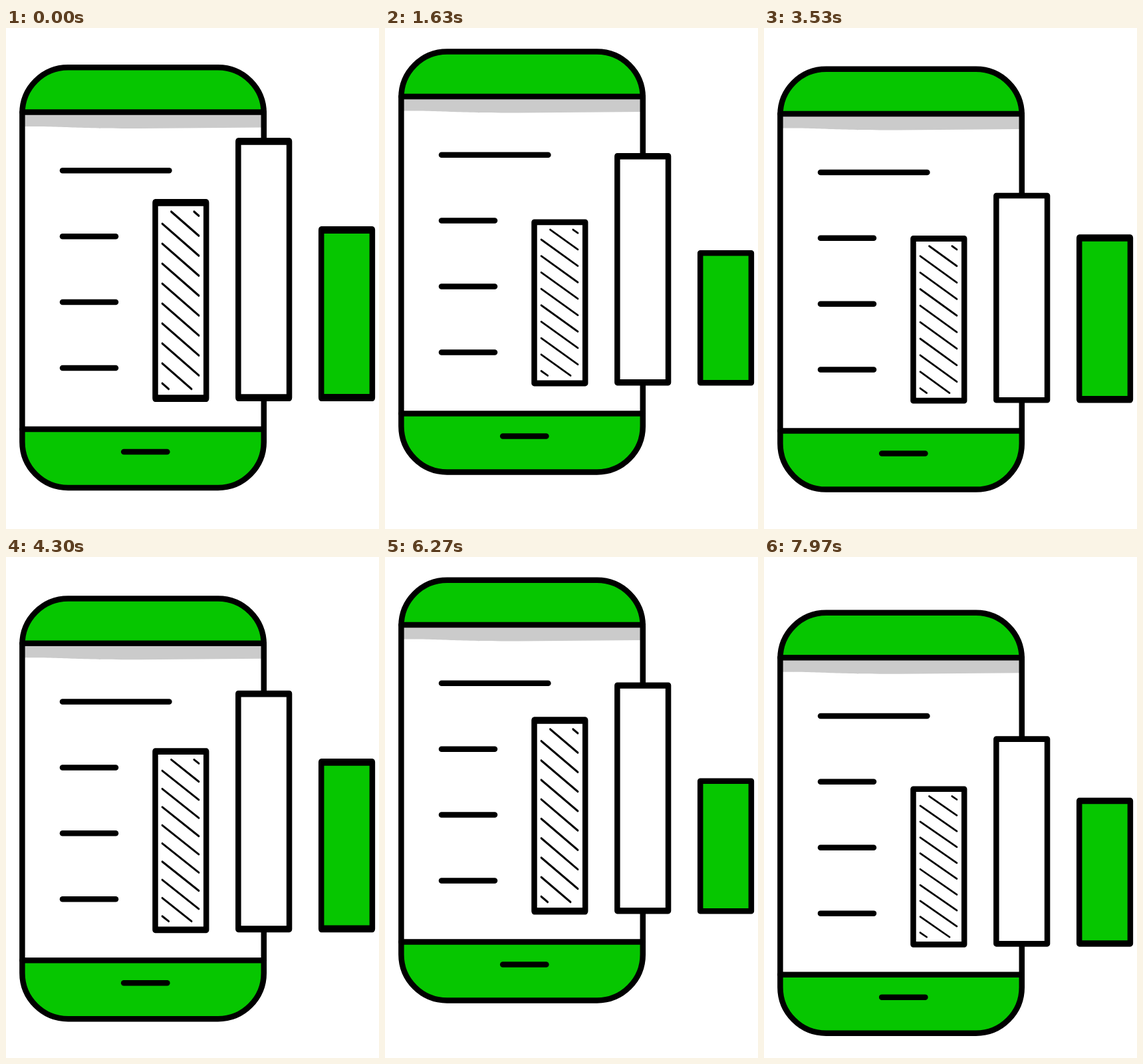
Animation of 561 by 753 pixels, one loop 8000 ms. Source, as an HTML page with a canvas:

```html
<!DOCTYPE html>
<html lang="en">
<head>
<meta charset="utf-8">
<title>Phone with bars</title>
<style>
  html, body { margin: 0; width: 100%; height: 100%; overflow: hidden; background: #fff; }
  canvas { display: block; width: 561px; height: 753px; }
</style>
</head>
<body>
<canvas id="stage" width="561" height="753"></canvas>
<script>
const ctx = document.getElementById('stage').getContext('2d');
const LOOP = 8000;
const GREEN = '#06c600', GREY = '#cbcbcb', INK = '#000', PAPER = '#fff';
const STROKE = 8.5;
const LEFT = 24.4, RIGHT = 387.8, HEAD = 71.5, CHIN = 548;
const BAR_WIDTH = 76.7, BAR_STEP = 124.85;

// Each part swings between turning points [ms, value].
const phoneTop = swing([0, 55], [1960, 30], [3920, 60], [6120, 30], [8100, 80]);

const bars = [
  { rest: 241, foot: 507, fill: PAPER, hatched: true,
    height: swing([0, 305], [2400, 236], [5700, 303], [8400, 239]) },
  { rest: 313, foot: 506, fill: PAPER,
    height: swing([0, 396], [3130, 309], [5160, 396], [7240, 310], [9900, 350]) },
  { rest: 205, foot: 506, fill: GREEN,
    height: swing([0, 263], [1900, 201], [4100, 262], [6600, 202], [9500, 250]) }
];

// Ease in and out, halfway between the cubic and quintic smooth steps.
function ease(u) {
  const cubic = u * u * (3 - 2 * u);
  const quintic = u * u * u * (10 - 15 * u + 6 * u * u);
  return (cubic + quintic) / 2;
}

function swing(...keys) {
  return t => {
    const i = keys.findIndex(key => key[0] > t);
    const [t0, v0] = keys[i - 1], [t1, v1] = keys[i];
    return v0 + (v1 - v0) * ease((t - t0) / (t1 - t0));
  };
}

function line(x1, y1, x2, y2) {
  ctx.beginPath();
  ctx.moveTo(x1, y1);
  ctx.lineTo(x2, y2);
  ctx.stroke();
}

function drawPhone(top) {
  ctx.save();
  ctx.translate(0, top);
  const body = new Path2D();
  body.roundRect(LEFT, 4.2, RIGHT - LEFT, 631.8, 69);

  ctx.save();
  ctx.clip(body);
  ctx.fillStyle = GREEN;
  ctx.fillRect(LEFT, 0, RIGHT - LEFT, 640);
  ctx.fillStyle = PAPER;
  ctx.fillRect(LEFT, HEAD, RIGHT - LEFT, CHIN - HEAD);
  ctx.restore();

  // Shadow with a slightly sagging lower edge.
  ctx.fillStyle = GREY;
  ctx.beginPath();
  ctx.moveTo(28, HEAD);
  ctx.lineTo(28, 93);
  ctx.bezierCurveTo(90, 93, 100, 96, 200, 96);
  ctx.lineTo(385, 94.5);
  ctx.lineTo(385, HEAD);
  ctx.fill();

  ctx.lineWidth = STROKE;
  ctx.stroke(body);
  line(LEFT, HEAD, RIGHT, HEAD);
  line(LEFT, CHIN, RIGHT, CHIN);
  for (let row = 0; row < 4; row++) {
    const y = 159.3 + 98.9 * row;
    line(85, y, row ? 165 : 245.4, y);
  }
  line(177.2, 582, 242.4, 582);
  ctx.restore();
}

// Parallel diagonals, cut off at the edges of the bar.
function drawHatch() {
  const slope = 0.69, left = 10.5, right = 65.5, top = -226, bottom = -15.3;
  ctx.lineWidth = 2.7;
  for (let i = 0; i < 11; i++) {
    const y = -22 - 23.7 * i;
    const yAt = x => y + (x - left) * slope;
    const x1 = Math.max(left, left + (top - y) / slope);
    const x2 = Math.min(right, left + (bottom - y) / slope);
    line(x1, yAt(x1), x2, yAt(x2));
  }
}

// The whole bar stretches upward from its foot, strokes included.
function drawBar(bar, index, top, t) {
  ctx.save();
  ctx.translate(224.5 + index * BAR_STEP, top + bar.foot);
  ctx.scale(1, bar.height(t) / bar.rest);
  ctx.beginPath();
  ctx.rect(0, STROKE / 2 - bar.rest, BAR_WIDTH, bar.rest - STROKE);
  ctx.fillStyle = bar.fill;
  ctx.fill();
  ctx.lineWidth = STROKE;
  ctx.stroke();
  if (bar.hatched) drawHatch();
  ctx.restore();
}

function draw(now) {
  const t = now % LOOP, top = phoneTop(t);
  ctx.fillStyle = PAPER;
  ctx.fillRect(0, 0, 561, 753);
  ctx.strokeStyle = INK;
  ctx.lineCap = ctx.lineJoin = 'round';
  drawPhone(top);
  bars.forEach((bar, i) => drawBar(bar, i, top, t));
}

let start;
function tick(now) {
  start ??= now;
  draw(now - start);
  requestAnimationFrame(tick);
}
draw(0);
requestAnimationFrame(tick);
</script>
</body>
</html>
```
